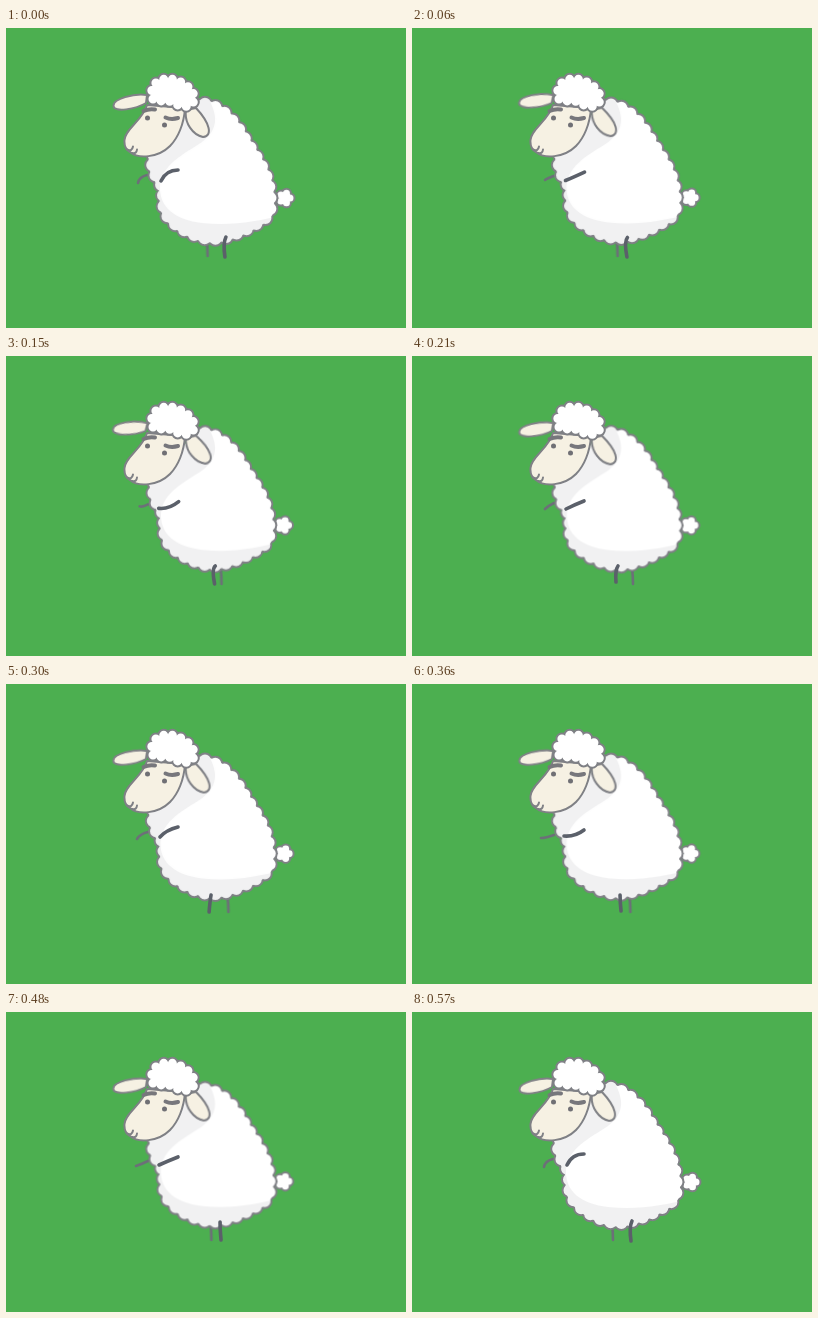
Write an HTML page without scripts that moves like this. It is 400x300 px and loops after 600 ms.

```html
<!DOCTYPE html>
<html lang="en">
<head>
<meta charset="utf-8">
<title>Walking sheep</title>
<style>
html, body { margin: 0; width: 100%; height: 100%; overflow: hidden; background: #4caf50; }
svg { display: block; width: 100vw; height: 100vh; }
.line { stroke: #7f8085; stroke-width: 2; stroke-linejoin: round; stroke-linecap: round; }
.limb { fill: none; stroke: #5b606a; stroke-width: 3.6; stroke-linecap: round; }
.far { stroke: #6c7078; stroke-width: 2.6; }
.skin { fill: #f6f1e3; }
.none { fill: none; }
.brow { fill: none; stroke: #77777c; stroke-width: 4; stroke-linecap: round; }
.eye { fill: #707075; }

/* Wool: round dots of radius --r along a curve make the scalloped edge */
.dots { stroke-dasharray: 0 1; stroke-linecap: round; }
.rim { fill: none; stroke: #7f8085; stroke-width: calc(var(--r) * 2 + 2px); }
.puff { fill: #fff; stroke: #fff; stroke-width: calc(var(--r) * 2 - 2px); }
.core { fill: #fff; stroke: #fff; stroke-width: var(--r); stroke-dasharray: none; }
.fleece { --r: 7px; }
.cap { --r: 5.5px; }
.tail { --r: 4.5px; }

.body, .ear { animation: 600ms linear infinite; }
.body { transform-origin: 205px 130px; animation-name: breathe; }
.left { transform-origin: 140px 71px; animation-name: flap-left; }
.right { transform-origin: 184px 83px; animation-name: flap-right; }
@keyframes breathe {
  0%, 95%, 100% { transform: none; }
  20% { transform: scale(.98); }
  35%, 80% { transform: scale(.985); }
  50% { transform: scale(.99); }
}
@keyframes flap-left {
  0%, 100% { transform: none; }
  20% { transform: rotate(10deg); }
  35% { transform: rotate(3deg); }
  50%, 80% { transform: rotate(2deg); }
}
@keyframes flap-right {
  0%, 100% { transform: none; }
  20% { transform: rotate(-7deg); }
  35% { transform: rotate(-3deg); }
  50%, 80% { transform: rotate(-2deg); }
}
.far-leg { animation: swing 300ms cubic-bezier(.37, 0, .63, 1) -30ms infinite alternate; }
@keyframes swing {
  from { transform: translateX(-11px); }
  to { transform: translateX(11px); }
}
.near-leg { animation: near-leg 600ms linear infinite; }
.near-arm { animation: near-arm 600ms linear infinite; }
.far-arm { animation: far-arm 600ms linear infinite; }
@keyframes near-leg {
  0%, 95%, 100% { d: path("M220 209Q217 215 219 229"); }
  20% { d: path("M211 210Q207 212 211 229"); }
  35% { d: path("M206 210Q203 214 204 226"); }
  50% { d: path("M205 211Q204 216 203 228"); }
  60% { d: path("M208 211Q208 218 209 227"); }
  80% { d: path("M214 210Q214 217 215 228"); }
}
@keyframes near-arm {
  0%, 95%, 100% { d: path("M155 153Q160 142 172 142"); }
  20% { d: path("M152 152Q163 156 173 146"); }
  35% { d: path("M154 153Q162 149 172 145"); }
  50% { d: path("M154 153Q160 146 172 143"); }
  60% { d: path("M152 152Q163 153 172 146"); }
  80% { d: path("M153 153Q162 149 172 145"); }
}
@keyframes far-arm {
  0%, 95%, 100% { d: path("M132 155Q133 149 141 147"); }
  20% { d: path("M134 149Q137 152 142 149"); }
  35% { d: path("M133 153Q136 150 142 147"); }
  50% { d: path("M131 155Q134 150 142 148"); }
  60% { d: path("M129 154Q134 154 142 151"); }
  80% { d: path("M130 154Q136 152 142 149"); }
}
</style>
</head>
<body>
<svg viewBox="0 0 400 300">
  <defs>
    <path id="fleece" class="dots" pathLength="30.01" d="M188 76C212 72 228 92 238 109S262 142 264 164S264 188 252 195S224 210 208 211S166 198 160 186S160 164 154 155S144 138 147 126"/>
    <path id="cap" class="dots" pathLength="13" d="M147 71C142 58 152 50 164 51S190 62 188 72S172 78 165 74S153 76 147 71Z"/>
    <circle id="tail" class="dots" pathLength="5" cx="279" cy="170" r="5"/>
    <mask id="inside" class="fleece" maskUnits="userSpaceOnUse" x="100" y="40" width="200" height="200">
      <use class="puff" href="#fleece"/>
      <path class="core" d="M188 76C212 72 228 92 238 109S262 142 264 164S264 188 252 195S224 210 208 211S166 198 160 186S160 164 154 155S144 138 147 126"/>
    </mask>
  </defs>

  <path class="limb far far-leg" d="M211 212Q212 220 212 228"/>
  <path class="limb far far-arm" d="M132 155Q133 149 141 147"/>

  <g class="body">
    <g class="tail">
      <use class="rim" href="#tail"/>
      <use class="puff" href="#tail"/>
    </g>
    <g class="fleece"><use class="rim" href="#fleece"/></g>
    <g mask="url(#inside)">
      <rect x="100" y="40" width="200" height="200" fill="#f1f1f2"/>
      <path fill="#fff" d="M196 60C213 85 214 100 196 114C178 126 156 136 154 158C153 180 170 192 196 195C225 198 250 194 280 186V60Z"/>
    </g>
  </g>

  <path class="limb near-leg" d="M220 209Q217 215 219 229"/>
  <path class="limb near-arm" d="M155 153Q160 142 172 142"/>

  <path class="ear left skin line" d="M141 67C128 65 107 71 107.5 78C108 85 130 81 140 75Z"/>
  <path class="skin line" d="M141 77C137 92 119 101 118.5 112C118 118 120 122 124 124C132 131 152 130 164 118C172 110 178 96 179 80Z"/>
  <path class="ear right skin line" d="M180 82C178 95 187 107 197 109C207 108 204 95 190 80Z"/>

  <path class="none line" d="M121 121.5Q126 124 127 118.5M126.5 125Q130.5 126 131 121.5"/>
  <path class="brow" d="M137.5 83Q143 80.5 149 81.5M159.5 89.5Q165 92 172 90"/>
  <circle class="eye" cx="141.5" cy="90" r="2.5"/>
  <circle class="eye" cx="158.5" cy="97" r="2.5"/>

  <g class="cap">
    <use class="rim" href="#cap"/>
    <use class="puff" href="#cap"/>
  </g>
</svg>
</body>
</html>
```
